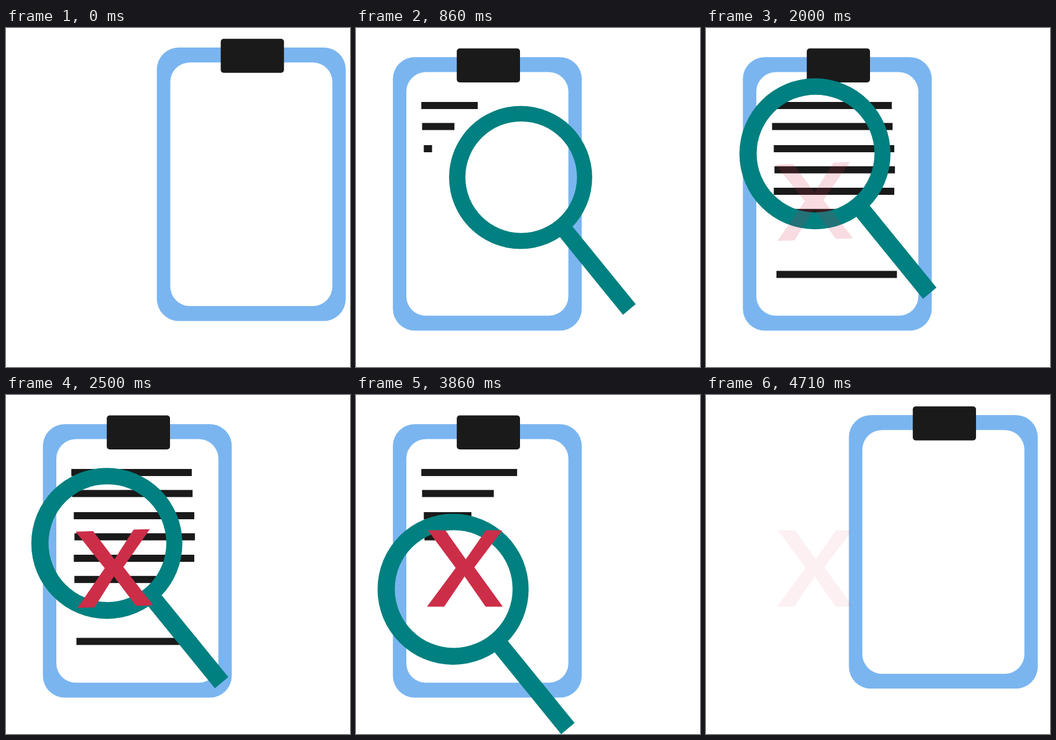
An HTML page with a canvas for the animation above (4.78 s loop, 581x573 px).

```html
<!DOCTYPE html>
<html lang="en">
<head>
<meta charset="utf-8">
<title>Document check</title>
<style>
  html, body { margin: 0; width: 100%; height: 100%; overflow: hidden; background: #fff; }
  canvas { display: block; }
</style>
</head>
<body>
<canvas id="stage" width="581" height="573"></canvas>
<script>
const ctx = document.getElementById('stage').getContext('2d');
const LOOP = 4780, STEP = LOOP / 67, SLIDE = 8 * STEP, WIPE = 5 * STEP;
const BLUE = '#7ab5f0', INK = '#1a1a1a', TEAL = '#008080', RED = '#cc2e48';

// x, y and, for the short line, width
const LINES = [
  [110.3, 125], [111.6, 160.5], [114.5, 198], [115.6, 233.7],
  [114.5, 270], [115.5, 305.8, 138], [119, 410.5]
];
// time, x, y of the lens centre
const LENS_PATH = [
  [856, 276, 249.5], [927, 267.5, 247], [1213, 260, 271.5], [1569, 213.5, 221.5],
  [1784, 193, 202], [2497, 170.3, 250.8], [3282, 165.8, 308.3], [3852, 164, 328.3]
];
const HANDLE = [[92.5, 87.5], [205.2, 226], [182.5, 245], [70, 106.5]];
const CROSS = [
  [-62.5, -64.5], [-33, -64.5], [1.5, -15.5], [35.5, -64.5], [63, -64.5], [16, -2],
  [64, 64.5], [35, 64.5], [-0.5, 13.5], [-35, 64.5], [-64, 64.5], [-15.5, -1]
];

const clamp = v => Math.max(0, Math.min(1, v));
const ease = p => clamp(p) ** 1.28;
const pop = p => 1 - (1 - clamp(p)) ** 3;

// Smooth curve through the rows of a path
function along(path, t) {
  const last = path.length - 1;
  if (t <= path[0][0]) return path[0].slice(1);
  if (t >= path[last][0]) return path[last].slice(1);
  const i = path.findIndex(row => row[0] > t) - 1;
  const a = path[i], b = path[i + 1];
  const before = path[Math.max(0, i - 1)], after = path[Math.min(last, i + 2)];
  const span = b[0] - a[0], u = (t - a[0]) / span;
  return a.slice(1).map((v, k) => {
    const w = b[k + 1];
    const m = (w - before[k + 1]) / (b[0] - before[0]) * span;
    const n = (after[k + 1] - v) / (after[0] - a[0]) * span;
    return v + u * (m + u * (3 * (w - v) - 2 * m - n + u * (2 * (v - w) + m + n)));
  });
}

function box(x, y, w, h, r, color) {
  ctx.fillStyle = color;
  ctx.beginPath();
  ctx.roundRect(x, y, w, h, r);
  ctx.fill();
}

function polygon(points, color) {
  ctx.fillStyle = color;
  ctx.beginPath();
  points.forEach(([x, y]) => ctx.lineTo(x, y));
  ctx.fill();
}

function drawBoard(t) {
  const away = 1 - ease(Math.min(t, LOOP - t) / SLIDE);
  ctx.save();
  ctx.translate(192.5 * away, -16.3 * away);
  box(62.3, 49.2, 319, 462.3, 37, BLUE);
  box(85, 74.5, 273.7, 411.8, 33, '#fff');
  box(170.2, 34.5, 106.8, 57.5, 5, INK);
  ctx.restore();
}

// Lines wipe in from the top and out from the bottom, one step apart,
// with a pause between the first four and the rest
function drawLines(t) {
  ctx.fillStyle = INK;
  LINES.forEach(([x, y, width = 203.5], i) => {
    const start = 689 + STEP * (i < 4 ? i : i + 4);
    const end = 3116 + STEP * (i < 4 ? 9.3 - i : 6 - i);
    ctx.fillRect(x, y, width * (clamp((t - start) / WIPE) - clamp((t - end) / WIPE)), 12);
  });
}

function drawLens(t) {
  const scale = Math.min(pop((t - 643) / 341), pop((4341 - t) / 341));
  if (scale <= 0) return;
  const [x, y] = along(LENS_PATH, t);
  ctx.save();
  ctx.translate(x + 39, y + 58.5);
  ctx.scale(scale, scale);
  ctx.translate(-39, -58.5);
  polygon(HANDLE, TEAL);
  ctx.beginPath();
  ctx.arc(0, 0, 127.6, 0, 2 * Math.PI);
  ctx.arc(1, -0.4, 99.5, 0, 2 * Math.PI, true);
  ctx.fill();
  ctx.restore();
}

// The cross swells, rises and tilts once, then settles upright
function drawCross(t) {
  const u = clamp((t - 2497) / 1355);
  const swell = Math.sin(Math.PI * u) ** 2;
  const scale = 1 + 0.285 * swell;
  ctx.save();
  ctx.globalAlpha = Math.min(ease((t - 1857) / SLIDE), ease((LOOP - t) / SLIDE));
  ctx.translate(182.3 + 1.6 * u * u, 293.3 - 17.2 * swell);
  ctx.rotate((2 * (u - 1) - 3.7 * swell) * Math.PI / 180);
  ctx.scale(scale, scale);
  polygon(CROSS, RED);
  ctx.restore();
}

function draw(now) {
  const t = Math.floor(now % LOOP / STEP) * STEP;
  ctx.clearRect(0, 0, 581, 573);
  drawBoard(t);
  drawLines(t);
  drawLens(t);
  drawCross(t);
}

let origin;
function tick(now) {
  origin ??= now;
  draw(now - origin);
  requestAnimationFrame(tick);
}
requestAnimationFrame(tick);
</script>
</body>
</html>
```
